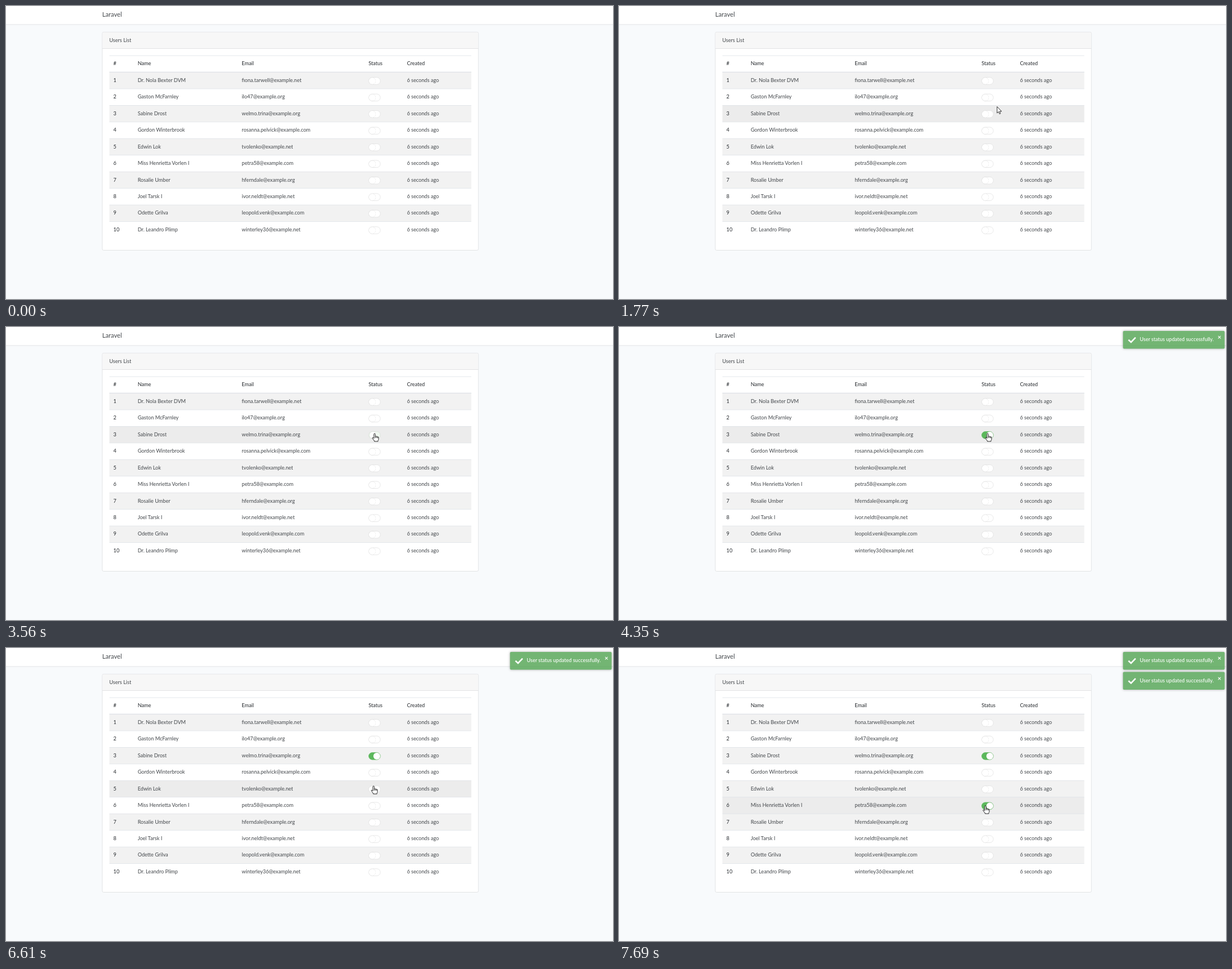
Recreate the animation shown at these times as an HTML page. Size 1077 px wide and 520 px high, loop 8000 ms.

```html
<!DOCTYPE html>
<html lang="en">
<head>
<meta charset="utf-8">
<title>Users List</title>
<style>
html, body { margin: 0; width: 100%; height: 100%; overflow: hidden; background: #f8fafc; }
svg { display: block; font: 9.15px Lato, "Open Sans", sans-serif; fill: #43474b; }
.nav { fill: #fff; filter: drop-shadow(0 1.2px 1.2px rgba(0, 0, 0, .08)); }
.th { fill: #25292d; }
.line { fill: #dee2e6; }
.knob { fill: #fff; filter: drop-shadow(0 .6px .7px rgba(0, 0, 0, .26)); }
.toast { filter: drop-shadow(0 0 2px #999); }
.toast text { fill: #fff; font-size: 9.05px; font-weight: 500; }
.toast .close { font-size: 11.5px; font-weight: 700; }
</style>
</head>
<body>
<svg id="stage" width="1077" height="520" viewBox="0 0 1077 520">
  <rect class="nav" x="-5" y="-5" width="1087" height="37"/>
  <text x="170.7" y="19.4" font-size="11.2">Laravel</text>
  <rect x="170.8" y="46.3" width="667.4" height="387.2" rx="2.4" fill="#fff" stroke="#dcdee0" stroke-width=".8"/>
  <path d="M171.2 75.5V48.7q0-2 2-2H835.8q2 0 2 2V75.5z" fill="#f7f7f7"/>
  <rect x="171" y="75.2" width="667" height=".8" fill="#dcdee0"/>
  <text x="183.3" y="64">Users List</text>
  <rect class="line" x="183.5" y="87.7" width="642" height=".8"/>
  <g id="table"></g>
  <rect class="line" x="183.5" y="116.7" width="642" height="1.2"/>
  <g id="toasts"></g>
  <g id="cursor" stroke-linejoin="round">
    <path id="arrow" d="M0 0V11.4L2.6 9 4.3 13 6.1 12.2 4.4 8.4H8z" fill="#fff" stroke="#000" stroke-width=".8"/>
    <path id="beam" d="M-2.5-5H-.6L0-4.5.6-5H2.5M0-4.5V4.5M-2.5 5H-.6L0 4.5.6 5H2.5" fill="none" stroke="#333" stroke-width=".9"/>
    <path id="hand" d="M-1.2 8V1.2a1.2 1.2 0 0 1 2.4 0V5q1.2-.6 2.2.3 1.3-.5 2.1.5 1.5-.2 1.5 1.4V10q0 1.6-1 2.6V14H-.5V13L-3.8 8.8q-.8-1.6.6-1.6 1 0 2 1.6zM1.2 5V8M3.4 5.4V8M5.5 5.9V8.2" fill="#fff" stroke="#111" stroke-width=".9"/>
  </g>
</svg>
<script>
const LOOP = 8000, TOP = 117.5, PITCH = 29.45;
const COLS = [190.6, 233.7, 418.3, 643.2, 711.4];
const USERS = [
  ["Dr. Nola Bexter DVM", "fiona.tarwell@example.net"],
  ["Gaston McFarnley", "ilo47@example.org"],
  ["Sabine Drost", "welmo.trina@example.org"],
  ["Gordon Winterbrook", "rosanna.pelvick@example.com"],
  ["Edwin Lok", "tvolenko@example.net"],
  ["Miss Henrietta Vorlen I", "petra58@example.com"],
  ["Rosalie Umber", "hferndale@example.org"],
  ["Joel Tarsk I", "ivor.neldt@example.net"],
  ["Odette Grilva", "leopold.venk@example.com"],
  ["Dr. Leandro Plimp", "winterley36@example.net"]
];
// pointer path: time, x, y
const PATH = [
  [1120, 1015, 505], [1440, 726, 283], [1830, 661, 160], [1940, 660, 157],
  [2300, 650, 130], [2400, 650, 130], [2700, 653, 167], [2770, 653, 169],
  [3240, 654, 189], [6149, 654, 189], [6150, 654, 193], [6210, 654, 193],
  [6850, 651, 276], [7000, 651, 276], [7080, 650, 280]
];
const CLICKS = { 2: 3545, 5: 7215 };
const SHOWN = [4130, 7440];

const $ = id => document.getElementById(id);
const clamp = v => Math.max(0, Math.min(1, v));
const ease = v => 1 - (1 - clamp(v)) ** 2.2;
const cell = (col, y, text, cls = "") =>
  `<text class="${cls}" x="${COLS[col]}" y="${y}">${text}</text>`;

$("table").innerHTML =
  ["#", "Name", "Email", "Status", "Created"].map((h, i) => cell(i, 105.2, h, "th")).join("") +
  USERS.map(([name, email], i) => {
    const y = TOP + PITCH * i, base = y + 17.3;
    return `<rect class="row" x="183.5" y="${y}" width="642" height="${PITCH}"/>
      <rect class="line" x="183.5" y="${y - .4}" width="642" height=".8"/>` +
      cell(0, base, i + 1, "th") + cell(1, base, name) + cell(2, base, email) +
      `<rect class="track" x="643.6" y="${y + 9.2}" width="20.6" height="12.6" rx="6.3" stroke-width=".7"/>
      <circle class="knob" cy="${y + 15.5}" r="6.1"/>` + cell(4, base, "6 seconds ago");
  }).join("");

$("toasts").innerHTML = SHOWN.map(() => `<g class="toast">
  <rect x="894.3" y="7" width="180.3" height="31.6" rx="1.8" fill="#51a351"/>
  <path d="M904 22.8L908.5 27 916.5 18.6" fill="none" stroke="#fff" stroke-width="2.6"/>
  <text x="924" y="25.2">User status updated successfully.</text>
  <text class="close" x="1062" y="22.2">×</text></g>`).join("");

const rows = document.querySelectorAll(".row");
const tracks = document.querySelectorAll(".track");
const knobs = document.querySelectorAll(".knob");
const toasts = document.querySelectorAll(".toast");

function pointer(t) {
  const next = PATH.findIndex(p => p[0] > t);
  if (next < 0) return PATH[PATH.length - 1].slice(1);
  const [t0, x0, y0] = PATH[next - 1], [t1, x1, y1] = PATH[next];
  const k = (t - t0) / (t1 - t0);
  return [x0 + (x1 - x0) * k, y0 + (y1 - y0) * k];
}

function drawPointer(t) {
  const visible = t >= PATH[0][0];
  let hover = -1, shape = "arrow";
  if (visible) {
    const [x, y] = pointer(t);
    if (x > 183 && x < 826) hover = Math.floor((y - TOP) / PITCH);
    const local = y - TOP - hover * PITCH;
    if (hover >= 0 && hover < USERS.length) {
      if (x > 643 && x < 665 && Math.abs(local - 15.5) < 7) shape = "hand";
      else if (x > 711 && x < 768 && Math.abs(local - 14.5) < 6.5) shape = "beam";
    }
    $("cursor").setAttribute("transform", `translate(${x} ${y})`);
  }
  for (const id of ["arrow", "beam", "hand"])
    $(id).style.display = visible && id === shape ? "" : "none";
  rows.forEach((row, i) => row.style.fill = i === hover ? "#ececec" : i % 2 ? "#fff" : "#f2f2f2");
}

function draw(t) {
  drawPointer(t);
  const green = [92, 184, 92];
  USERS.forEach((_, i) => {
    const age = i in CLICKS ? t - CLICKS[i] : 0;
    const on = ease(age / 400);
    const mix = from => `rgb(${green.map(c => from + (c - from) * on)})`;
    tracks[i].style.fill = mix(255);
    tracks[i].style.stroke = mix(223);
    knobs[i].setAttribute("cx", 649.9 + 8 * ease(age / 200));
  });
  toasts.forEach((toast, i) => {
    toast.style.opacity = .8 * clamp((t - SHOWN[i]) / 220);
    // the newest message pushes the older one down
    const y = i === 0 && t >= SHOWN[1] ? 35.5 : 0;
    toast.setAttribute("transform", `translate(0 ${y})`);
  });
}

const start = performance.now();
function tick() {
  draw((performance.now() - start) % LOOP);
  requestAnimationFrame(tick);
}
tick();
</script>
</body>
</html>
```
